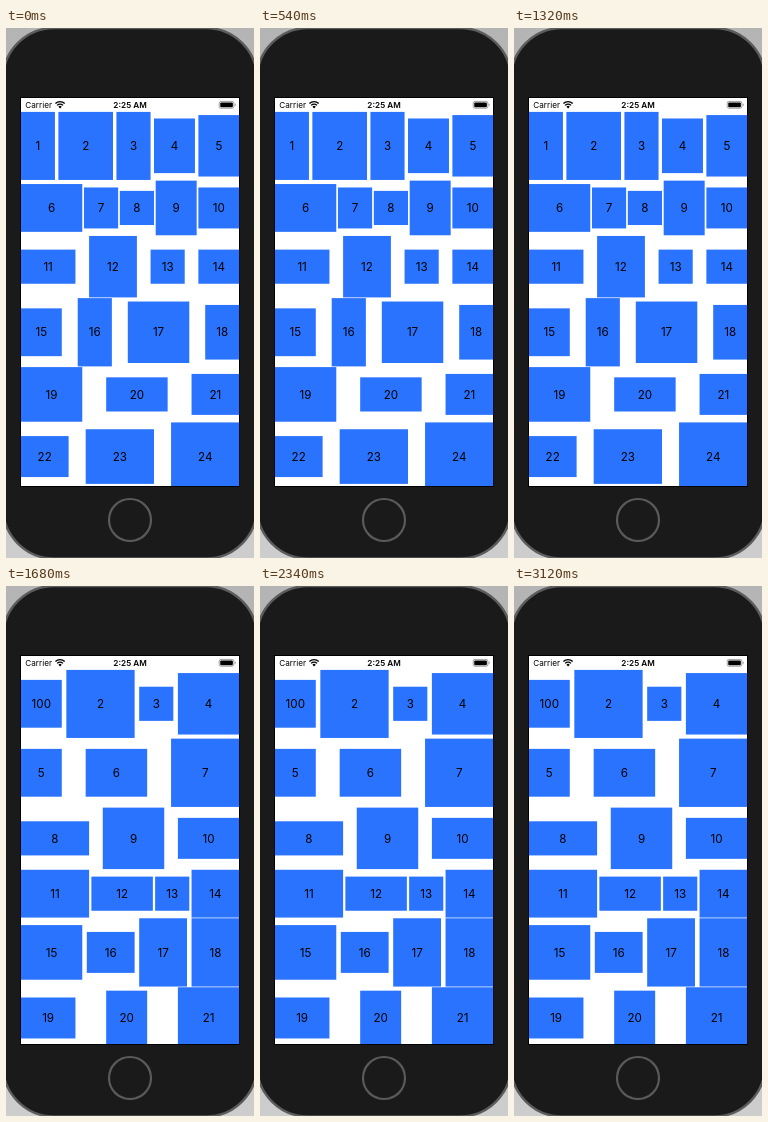
These frames come from a looping animation (248 by 530 pixels, 3.18 s). An HTML page:

```html
<!DOCTYPE html>
<html lang="en">
<head>
<meta charset="utf-8">
<title>Justified rows</title>
<style>
  html, body { margin: 0; width: 100%; height: 100%; overflow: hidden; background: #c4c4c4; }
  svg { display: block; width: 248px; height: 530px; }
  text { font-family: Inter, "Liberation Sans", sans-serif; fill: #000; }
  .tile rect { fill: #2a73ff; }
  .tile text { font-size: 17px; text-anchor: middle; }
  .bar { font-size: 12px; }
  .time { font-weight: 600; text-anchor: middle; }
  .page { animation: first 3180ms step-end infinite; }
  #b { animation-name: second; }
  @keyframes first { 0% { visibility: visible; } 52.83%, 100% { visibility: hidden; } }
  @keyframes second { 0% { visibility: hidden; } 52.83%, 100% { visibility: visible; } }
</style>
</head>
<body>
<svg viewBox="0 0 248 530">
  <defs>
    <linearGradient id="back" x2="0" y2="1">
      <stop offset="0" stop-color="#b4b4b4"/>
      <stop offset="1" stop-color="#cdcdcd"/>
    </linearGradient>
    <clipPath id="view"><rect width="320" height="548"/></clipPath>
  </defs>
  <rect width="248" height="530" fill="url(#back)"/>
  <rect x="-3" y="0" width="254" height="530.5" rx="51" fill="#1a1a1a" stroke="#5c5c5c" stroke-width="2.4"/>
  <circle cx="124" cy="492" r="21" fill="#1a1a1a" stroke="#5a5a5a" stroke-width="2.2"/>
  <rect x="14" y="69" width="220" height="390" fill="#000"/>
  <rect x="15" y="70" width="218" height="388" fill="#fff"/>

  <g transform="translate(14.8 70) scale(.683)">
    <text class="bar" x="6.5" y="14.4">Carrier</text>
    <g fill="none" stroke="#000" stroke-width="2">
      <path d="M50.7 8.1a9.7 9.7 0 0 1 13.6 0M53.2 10.8a6.2 6.2 0 0 1 8.6 0"/>
      <path d="M57.5 15.2l-2.4-2.5a3.4 3.4 0 0 1 4.8 0z" fill="#000" stroke="none"/>
    </g>
    <text class="bar time" x="160" y="14.4">2:25 AM</text>
    <rect x="290.5" y="5" width="21.5" height="10" rx="2.6" fill="none" stroke="#777"/>
    <rect x="292" y="6.5" width="18.5" height="7" rx="1.4"/>
    <path d="M313.3 8.2a2 2 0 0 1 0 3.7z" fill="#777"/>
  </g>

  <g transform="translate(14.8 83.65) scale(.683)">
    <g clip-path="url(#view)">
      <g id="a" class="page"></g>
      <g id="b" class="page"></g>
    </g>
  </g>
</svg>
<script>
  const WIDTH = 320, ROW_GAP = 1;

  // Each row lists its tiles as width x height, in points.
  const pages = {
    a: ["50x100 80x100 50x100 60x80 60x90",
        "90x70 50x60 50x50 60x80 60x60",
        "80x50 70x90 50x50 60x50",
        "60x70 50x100 90x90 50x80",
        "90x80 90x50 70x60",
        "70x60 100x80 100x100"],
    b: ["60x70 100x100 50x50 90x90",
        "60x70 90x70 100x100",
        "100x50 90x90 90x60",
        "100x70 90x50 50x50 70x70",
        "90x80 70x60 70x100 70x100",
        "80x60 60x80 90x90"]
  };

  function tile(x, y, w, h, label) {
    return `<g class="tile"><rect x="${x}" y="${y}" width="${w}" height="${h}"/>` +
      `<text x="${x + w / 2}" y="${y + h / 2 + 6.2}">${label}</text></g>`;
  }

  // Tiles are spread across the row and centred on its height.
  function layout(rows, firstLabel) {
    let top = 0, count = 0, out = "";
    for (const row of rows) {
      const sizes = row.split(" ").map(s => s.split("x").map(Number));
      const used = sizes.reduce((sum, [w]) => sum + w, 0);
      const gap = (WIDTH - used) / (sizes.length - 1);
      const height = Math.max(...sizes.map(s => s[1]));
      let x = 0;
      for (const [w, h] of sizes) {
        count++;
        out += tile(x, top + (height - h) / 2, w, h, count === 1 ? firstLabel : count);
        x += w + gap;
      }
      top += height + ROW_GAP;
    }
    return out;
  }

  document.getElementById("a").innerHTML = layout(pages.a, 1);
  document.getElementById("b").innerHTML = layout(pages.b, 100);
</script>
</body>
</html>
```
